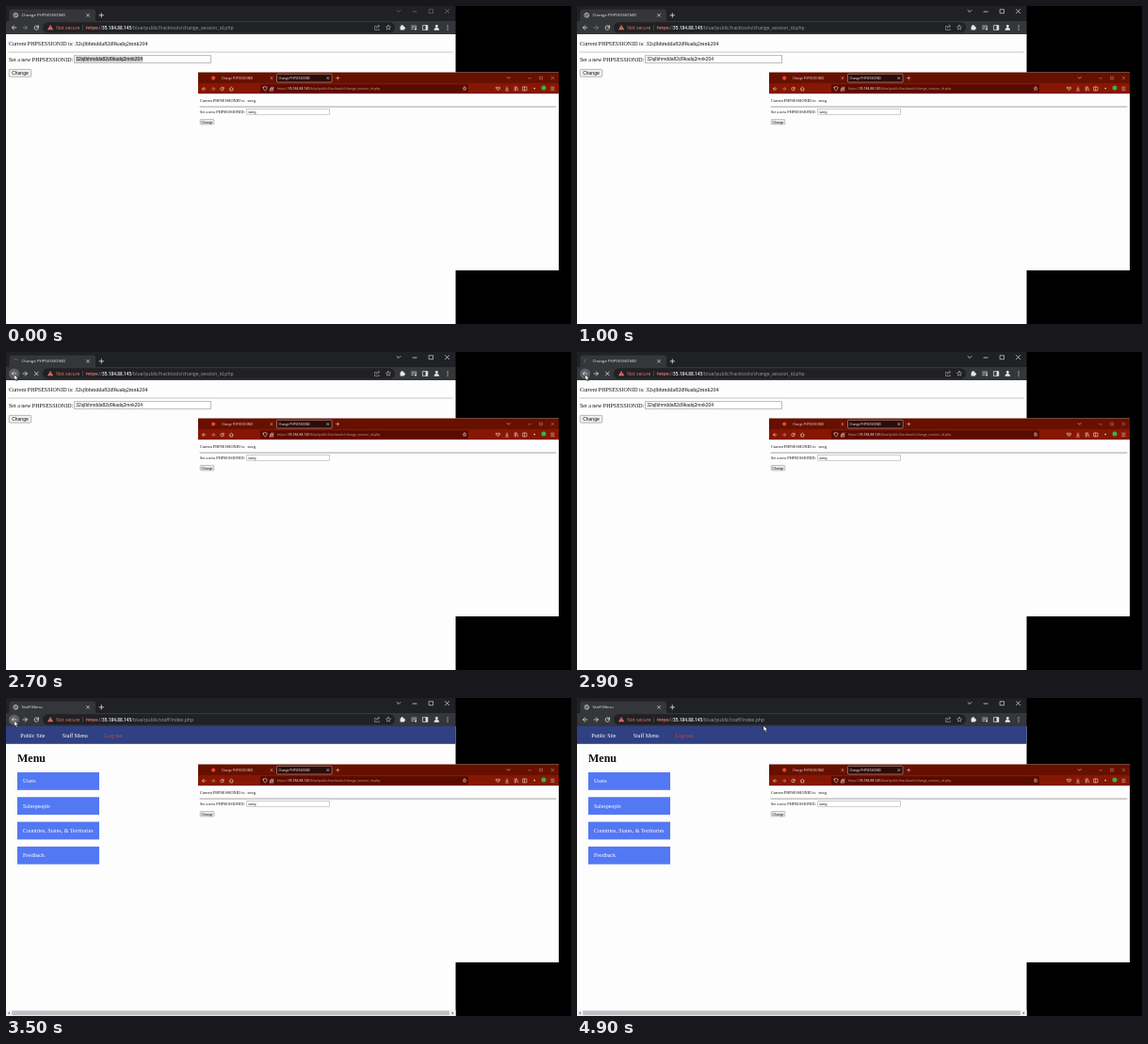
Recreate the animation shown at these times as an HTML page. Size 600 by 338 pixels, loop 5 s.

```html
<!DOCTYPE html>
<html lang="en">
<head>
<meta charset="utf-8">
<title>Session change</title>
<style>
html, body { margin: 0; width: 100%; height: 100%; overflow: hidden; background: #000; }
svg { display: block; width: 100vw; height: 100vh; }
text { white-space: pre; }
.ui { font-family: "Open Sans", "Noto Sans", sans-serif; }
.serif { font-family: "Liberation Serif", "Times New Roman", serif; }
.sans { font-family: "Liberation Sans", Arial, sans-serif; }
.line { fill: none; stroke-linecap: round; stroke-linejoin: round; }
</style>
</head>
<body>
<svg id="stage" viewBox="0 0 600 338" preserveAspectRatio="none"></svg>
<script>
const LOOP = 5000, STEP = 100;
const FOCUS = 800, HOVER = 2000, LOAD = 2600, MISSING = 3400, MENU = 3500, LEAVE = 4000;
const SID = "32sjlbhmdda82d9kadq2mnk204";
const HOST = "35.184.88.145";
const TOOL_PATH = "/blue/public/hacktools/change_session_id.php";
const MENU_PATH = "/blue/public/staff/index.php";

const text = (x, y, size, str, { font = "serif", fill = "#111", more = "" } = {}) =>
  `<text class="${font}" x="${x}" y="${y}" font-size="${size}" fill="${fill}" ${more}>${str}</text>`;
const ui = (x, y, size, str, fill, more) => text(x, y, size, str, { font: "ui", fill, more });
const rect = (x, y, w, h, fill, more = "") =>
  `<rect x="${x}" y="${y}" width="${w}" height="${h}" fill="${fill}" ${more}/>`;
const dot = (x, y, r, fill, more = "") => `<circle cx="${x}" cy="${y}" r="${r}" fill="${fill}" ${more}/>`;
const line = (d, color, w = 0.7, more = "") =>
  `<path class="line" d="${d}" stroke="${color}" stroke-width="${w}" ${more}/>`;
const group = (id, body) => `<g id="${id}">${body}</g>`;

const cross = (x, y, r, color, w) =>
  line(`M${x - r} ${y - r}l${2 * r} ${2 * r}m0 ${-2 * r}l${-2 * r} ${2 * r}`, color, w);
const plus = (x, y, r, color, w) => line(`M${x - r} ${y}h${2 * r}M${x} ${y - r}v${2 * r}`, color, w);
const chevron = (x, y, r, color, w) => line(`M${x - r} ${y - r / 2}l${r} ${r}l${r} ${-r}`, color, w);
// dir: -1 points left, 1 points right
const arrow = (x, y, r, dir, color, w) =>
  line(`M${x - dir * r} ${y}h${dir * 2 * r}m${-dir * r} ${-r}l${dir * r} ${r}l${-dir * r} ${r}`, color, w);
const reload = (x, y, r, color, w) =>
  line(`M${x + r * 0.75} ${y - r * 0.65}A${r} ${r} 0 1 0 ${x + r} ${y + r * 0.2}` +
       `M${x + r} ${y - r}v${r * 0.8}h${-r * 0.8}`, color, w);
function star(x, y, r, color, w) {
  const pts = Array.from({ length: 10 }, (_, i) => {
    const a = (i * Math.PI) / 5 - Math.PI / 2, q = i % 2 ? r * 0.45 : r;
    return `${(x + q * Math.cos(a)).toFixed(2)} ${(y + q * Math.sin(a)).toFixed(2)}`;
  });
  return line(`M${pts.join("L")}Z`, color, w);
}

function windowButtons() {
  return chevron(417, 5.5, 1.9, "currentColor", 0.7) +
    line("M432 6h4", "currentColor", 0.7) +
    line("M449.5 3.7h4v4h-4z", "currentColor", 0.6) +
    cross(468.5, 5.6, 2, "currentColor", 0.7);
}

function toolbarIcons() {
  const c = "#e8eaed", g = "#bdc1c6";
  return line("M393.4 21.5h-1.8v4h4.6v-1.2M393.3 23.6q.3-2.4 3-2.4m-1.2-1.3l1.4 1.3l-1.4 1.4", g, 0.5) +
    star(406, 23, 2.7, g, 0.55) +
    rect(418.6, 21.3, 4.3, 4.3, c, 'rx=".5"') + dot(420.6, 21, 1, c) + dot(423.1, 23.4, 1, c) +
    line("M430.6 21h4M430.6 22.7h4M430.6 24.4h2.2M435.6 21v3.6", c, 0.6) + dot(434.9, 24.7, 0.9, c) +
    line("M442.8 20.6h5v4.8h-5z", c, 0.7) + rect(445.6, 20.6, 2.2, 4.8, c) +
    dot(457.3, 21.5, 1.4, c) + `<path d="M454.6 25.7q0-2.6 2.7-2.6t2.7 2.6z" fill="${c}"/>` +
    [20.9, 23, 25.1].map(y => dot(469, y, 0.6, c)).join("");
}

function mainFrame() {
  const c = "#e8eaed", red = "#f0756a";
  return rect(0, 0, 477.5, 17, "#202124") +
    `<path d="M1 16.5q2.5 0 2.5-2.5V6q0-2.5 2.5-2.5h86.5q2.5 0 2.5 2.5v8q0 2.5 2.5 2.5z" fill="#35363a"/>` +
    rect(0, 16, 477.5, 14, "#35363a") +
    rect(39, 17.2, 374, 11.4, "#202124", 'rx="5.7"') +
    group("globe", dot(10.3, 9.8, 2.4, "none", `stroke="${c}" stroke-width=".6"`) +
      line("M8.4 8.7l2 .6l-.8 1.4M10.5 11.8l.6-1.2l1.4-.3M9.8 7.6l1.6 1", c, 0.55)) +
    group("spinner", line("M10.3 7.4A2.4 2.4 0 0 1 12.7 9.8", "#777b80", 0.6)) +
    ui(16.6, 11.4, 4.33, "", "#e8eaed", 'id="title"') +
    cross(87, 9.8, 1.4, c, 0.65) + plus(101.3, 9.8, 2.2, c, 0.75) +
    group("controls", windowButtons()) +
    group("backHover", dot(8.6, 23, 5.6, "#5d6065")) +
    arrow(8.6, 23, 2.2, -1, c, 0.75) +
    group("forward", arrow(20.3, 23, 2.2, 1, "currentColor", 0.75)) +
    group("reload", reload(32.3, 23, 2.2, c, 0.75)) +
    group("stop", cross(32.3, 23, 1.9, c, 0.75)) +
    `<path d="M47.1 20l3 5.3h-6z" fill="${red}"/>` +
    line("M47.1 21.8v1.6M47.1 24.5v.1", "#202124", 0.5) +
    ui(53.2, 24.8, 5, "Not secure", red) +
    line("M81.5 20.3v5.4", "#5f6368", 0.5) +
    ui(85, 24.8, 5.05, "https", red) + line("M85 23.2h12.3", red, 0.5) +
    ui(97.2, 24.8, 5.05, "://", "#9aa0a6") +
    ui(102.1, 24.8, 4.75, HOST, "#f4f5f6", 'font-weight="600"') +
    ui(133.2, 24.8, 5.05, "", "#9aa0a6", 'id="path"') +
    toolbarIcons();
}

function formPage() {
  return text(3, 41.8, 6, "Current PHPSESSIONID is: " + SID) +
    line("M3 49h471", "#8a8a8a", 0.5) +
    text(3, 58.6, 6, "Set a new PHPSESSIONID:") +
    rect(72.4, 52.8, 145.4, 7.4, "#fff", 'stroke="#767676" stroke-width=".5"') +
    group("selection", rect(73.8, 53.6, 71.6, 6, "#c8c8c8")) +
    text(74.2, 58.3, 5, SID, { font: "sans" }) +
    rect(3.2, 67.4, 23.6, 7.8, "#efefef", 'rx="1" stroke="#767676" stroke-width=".5"') +
    text(6.2, 73.1, 5, "Change", { font: "sans" });
}

function missingPage() {
  return text(3, 44.6, 12, "Not Found", { more: 'font-weight="bold"' }) +
    text(3, 60.4, 6, "The requested URL was not found on this server.") +
    line("M3 68h471", "#8a8a8a", 0.5) +
    text(3, 76.6, 6, `Apache/2.4.18 (Ubuntu) Server at ${HOST} Port 443`, { more: 'font-style="italic"' });
}

function menuPage() {
  const white = { fill: "#fff" };
  const items = ["Users", "Salespeople", "Countries, States, &amp; Territories", "Feedback"];
  return rect(0, 30, 477.5, 18.8, "#2f4083") +
    text(15.3, 41.8, 6, "Public Site", white) +
    text(59.8, 41.8, 6, "Staff Menu", white) +
    text(104.6, 41.8, 6, "Log out", { fill: "#d8433f" }) +
    text(12, 68, 12, "Menu", { more: 'font-weight="bold"' }) +
    items.map((s, i) => rect(12, 79 + i * 26.3, 87, 18.8, "#5378f3") +
      text(18, 90.3 + i * 26.3, 6, s, white)).join("") +
    rect(0, 331.8, 477.5, 6.2, "#f1f1f1") + rect(6.3, 332.4, 464.5, 4.8, "#c1c1c1") +
    `<path d="M2.2 334.9l1.6-1.3v2.6zM475.3 334.9l-1.6-1.3v2.6z" fill="#505050"/>`;
}

function secondWindow() {
  const c = "#f6dcd6", dim = "#d39a8c";
  const title = "Change PHPSESSIONID";
  return rect(204, 70.5, 383, 210.5, "#fdfdfd") +
    rect(204, 70.5, 383, 12, "#671000") + rect(204, 82, 383, 11.2, "#861703") +
    dot(220.2, 76.6, 2.1, "#e8452f") +
    ui(229, 78, 3.1, title, c) + cross(282, 76.6, 1.1, c, 0.5) +
    rect(287.5, 72.3, 58.6, 8.7, "#2b0c09", 'rx="1" stroke="#cfa39a" stroke-width=".6"') +
    ui(289.6, 78, 3.1, title, "#fff") + cross(341.8, 76.6, 1.1, "#fff", 0.5) +
    plus(352.3, 76.6, 1.6, c, 0.55) +
    chevron(533.6, 76.4, 1.5, c, 0.6) + line("M554.6 76.8h2.8", dim, 0.5) +
    line("M567 75.2h2.6v2.6h-2.6z", dim, 0.5) + cross(580.5, 76.5, 1.4, dim, 0.5) +
    arrow(210.2, 88, 1.7, -1, c, 0.6) + arrow(220, 88, 1.7, 1, dim, 0.6) +
    reload(229.5, 88, 1.7, c, 0.6) +
    line("M237.3 88l2-1.9l2 1.9M237.9 87.7v2.2h2.8v-2.2", c, 0.6) +
    rect(270, 83.3, 221, 9, "#590b00", 'rx="1.2"') +
    line("M273.2 86.3l2-.7l2 .7q0 2.8-2 3.8q-2-1-2-3.8z", c, 0.6) +
    line("M280.8 87.8h3v2.2h-3zM281.3 87.6v-1q1-1.4 2 0v1M280.4 90.2l4-4.2", c, 0.55) +
    ui(287.8, 89.2, 3.49, `https://<tspan fill="#fff">${HOST}</tspan>${TOOL_PATH}`, dim) +
    star(487, 87.8, 2, c, 0.5) +
    line("M520.6 86.3h3.8v1.6q-1.9 3.2-3.8 0zM521.6 87.4l.9.9l.9-.9", c, 0.55) +
    line("M532 85.8v3m-1.2-1.1l1.2 1.2l1.2-1.2M530.4 90h3.2", c, 0.55) +
    line("M540.2 85.9v4M541.4 85.9v4M542.5 85.9l1.3 4", c, 0.6) +
    line("M549 86h4v3.8h-4zM550.6 86v3.8", c, 0.55) +
    dot(561.2, 87.6, 0.8, c) + dot(571, 87, 2.5, "#3fae49") +
    line("M578.8 86.2h3.2M578.8 87.8h3.2M578.8 89.4h3.2", c, 0.5) +
    text(206, 101.7, 4.2, "Current PHPSESSIONID is: ") + text(256.4, 101.7, 4.2, "sweg") +
    line("M206 107.1h378", "#7c7c7c", 0.7) +
    text(206, 113.8, 4.2, "Set a new PHPSESSIONID:") +
    rect(255.8, 109.4, 87.6, 5.8, "#fff", 'stroke="#999" stroke-width=".5"') +
    text(257.3, 113.5, 3.5, "sweg", { font: "sans" }) +
    rect(206.2, 120.5, 14.6, 5.4, "#e9e9ed", 'rx=".8" stroke="#8f8f9d" stroke-width=".5"') +
    text(207.6, 124.5, 3.4, "Change", { font: "sans" });
}

const pointer = `<path d="M0 0V6.2L1.5 4.9L2.6 7.2L3.7 6.7L2.7 4.5H4.6Z" fill="#fff"
  stroke="#000" stroke-width=".5" stroke-linejoin="round"/>`;

const stage = document.getElementById("stage");
stage.innerHTML = rect(0, 0, 600, 338, "#000") + rect(0, 30, 477.5, 308, "#fdfdfd") +
  mainFrame() + group("form", formPage()) + group("missing", missingPage()) +
  group("menu", menuPage()) + secondWindow() + group("cursor", pointer);

const part = Object.fromEntries([...stage.querySelectorAll("[id]")].map(n => [n.id, n]));
const show = (node, on) => node.setAttribute("display", on ? "inline" : "none");
const setText = (node, s) => { if (node.textContent !== s) node.textContent = s; };

// Pointer stops: time, x, y
const stops = [
  [1200, 62, 62], [1700, 3.6, 24.6], [1900, 3.6, 24.6], [2300, 8.4, 23.6],
  [3800, 8.6, 24], [4600, 198, 30.5], [4700, 198, 30.5], [4900, 198, 29.2]
];
function pointerAt(t) {
  const i = stops.findIndex(s => s[0] > t);
  if (i < 0) return stops[stops.length - 1].slice(1);
  const [t0, x0, y0] = stops[i - 1], [t1, x1, y1] = stops[i];
  const k = (t - t0) / (t1 - t0), e = k * k * (3 - 2 * k);
  return [x0 + (x1 - x0) * e, y0 + (y1 - y0) * e];
}

function render(t) {
  const loading = t >= LOAD && t < MENU, staff = t >= MISSING;
  show(part.form, !staff);
  show(part.missing, staff && t < MENU);
  show(part.menu, t >= MENU);
  show(part.selection, t < FOCUS);
  show(part.globe, !loading);
  show(part.spinner, loading);
  show(part.reload, !loading);
  show(part.stop, loading);
  show(part.backHover, t >= HOVER && t < LEAVE);
  part.controls.setAttribute("color", t < FOCUS ? "#77797d" : "#f1f3f4");
  part.forward.setAttribute("color", t < LOAD ? "#8a8d91" : "#e8eaed");
  part.spinner.setAttribute("transform", `rotate(${(t - LOAD) * -0.36} 10.3 9.8)`);
  setText(part.title, staff ? "Staff Menu" : "Change PHPSESSIONID");
  setText(part.path, staff ? MENU_PATH : TOOL_PATH);
  const visible = t >= stops[0][0];
  show(part.cursor, visible);
  if (visible) part.cursor.setAttribute("transform", `translate(${pointerAt(t).join(" ")})`);
}

const start = performance.now();
function tick() {
  const t = (performance.now() - start) % LOOP;
  render(Math.floor(t / STEP) * STEP);
  requestAnimationFrame(tick);
}
render(0);
requestAnimationFrame(tick);
</script>
</body>
</html>
```
